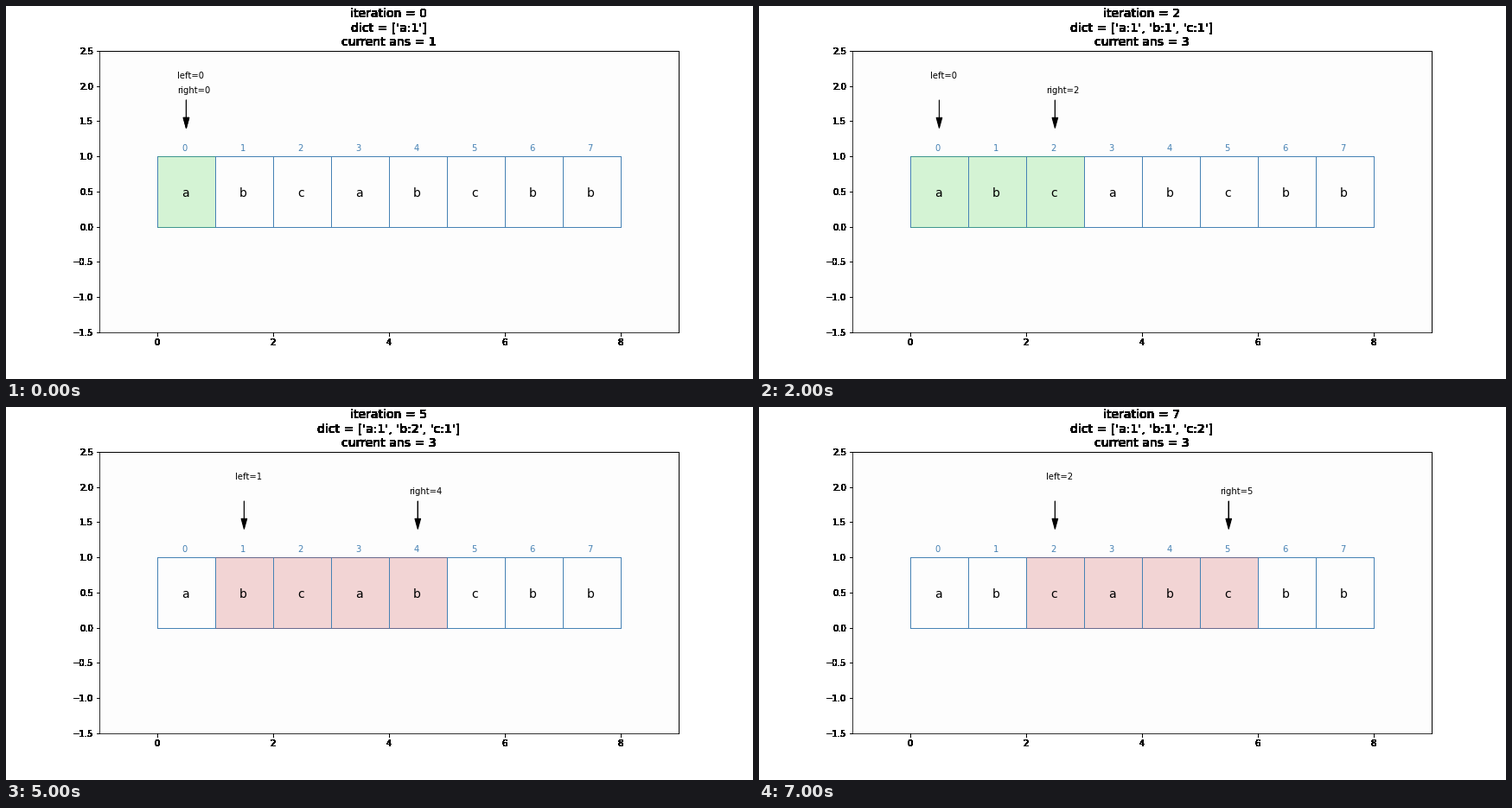
Animation of 864 by 432 pixels, one loop 8 s. Source, as a matplotlib script:

```python
import matplotlib.pyplot as plt
from matplotlib.animation import FuncAnimation
from matplotlib.patches import Rectangle

WORD = "abcabcbb"
STEPS = 8
BLUE = "steelblue"
GOOD, BAD = "limegreen", (0.78, 0.19, 0.19)


def window_states():
    """Slide a window over WORD, shrinking it whenever a letter repeats."""
    left = right = best = 0
    states = []
    for _ in range(STEPS):
        part = WORD[left:right + 1]
        counts = {c: part.count(c) for c in sorted(set(part))}
        unique = len(counts) == len(part)
        if unique:
            best = max(best, len(part))
        states.append((left, right, counts, unique, best))
        if unique:
            right += 1
        else:
            left += 1
    return states


def harden(artist, times=40):
    """Draw an artist repeatedly so its soft edges turn solid."""
    draw = artist.draw

    def draw_many(renderer):
        for _ in range(times):
            draw(renderer)

    artist.draw = draw_many


def make_arrow():
    return ax.arrow(0.5, 1.8, 0, -0.25, head_width=0.1, head_length=0.15,
                    fc="black", ec="black", zorder=3)


fig = plt.figure(figsize=(12, 6), dpi=72, facecolor="white")
fig.subplots_adjust(left=0.125, right=0.9, bottom=0.125, top=0.88)
ax = fig.add_subplot(facecolor="#fdfdfd")

n = len(WORD)
ax.hlines([0, 1], 0, n, color=BLUE, lw=1, zorder=1, capstyle="projecting")
ax.vlines(range(n + 1), 0, 1, color=BLUE, lw=1, zorder=2)
for i, letter in enumerate(WORD):
    ax.text(i + 0.42, 0.42, letter, fontsize=14)
    ax.text(i + 0.43, 1.08, str(i), fontsize=10, color=BLUE)

window = ax.add_patch(Rectangle((0, 0), 1, 1, alpha=0.2, lw=1, zorder=1.5))
left_arrow, right_arrow = make_arrow(), make_arrow()
left_label = ax.text(0.35, 2.1, "", fontsize=10)
right_label = ax.text(0.35, 1.9, "", fontsize=10)
ax.set_xlim(-1, n + 1)
ax.set_ylim(-1.5, 2.5)

for part in (ax.title, ax.xaxis, ax.yaxis, ax.spines["top"], ax.spines["right"]):
    harden(part)

states = window_states()


def update(step):
    left, right, counts, unique, best = states[step]
    window.set_x(left)
    window.set_width(right - left + 1)
    window.set_color(GOOD if unique else BAD)
    left_arrow.set_data(x=left + 0.5)
    right_arrow.set_data(x=right + 0.5)
    left_label.set_x(left + 0.35)
    left_label.set_text(f"left={left}")
    right_label.set_x(right + 0.35)
    right_label.set_text(f"right={right}")
    pairs = [f"{c}:{k}" for c, k in counts.items()]
    ax.set_title(f"iteration = {step}\ndict = {pairs}\ncurrent ans = {best}",
                 fontsize=14)


anim = FuncAnimation(fig, update, frames=STEPS, interval=1000,
                     repeat=True, repeat_delay=0)
plt.show()
```
